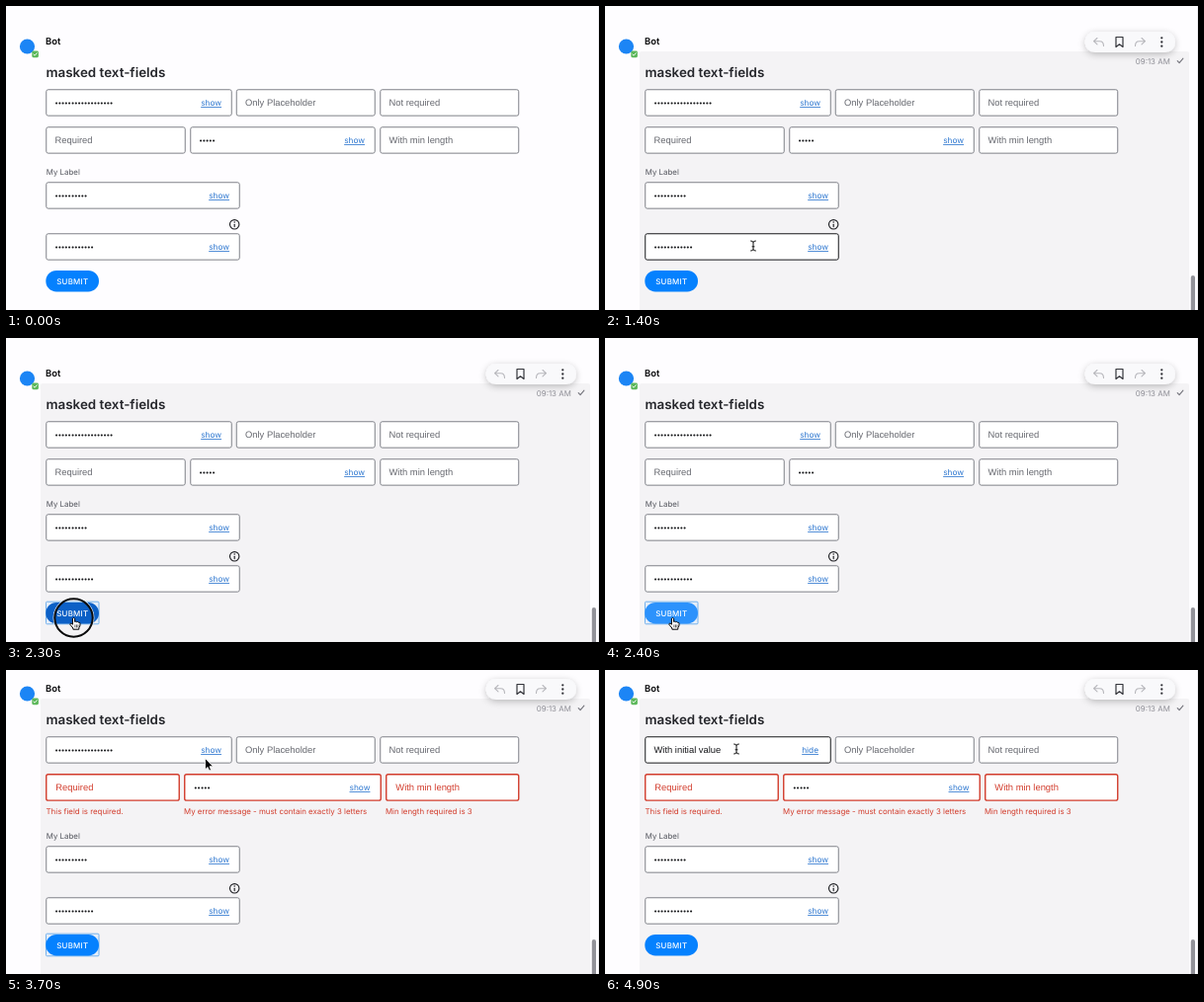
Recreate the animation shown at these times as an HTML page. Size 600 by 308 pixels, loop 5000 ms.

```html
<!DOCTYPE html>
<html lang="en">
<head>
<meta charset="utf-8">
<title>Masked text fields</title>
<style>
  html, body { margin: 0; width: 600px; height: 308px; overflow: hidden; background: #fefdff; }
  svg { display: block; }
  text {
    font-family: Inter, "Liberation Sans", sans-serif;
    font-size: 7.88px;
    text-rendering: geometricPrecision;
    white-space: pre;
  }
  .name { font-size: 9.45px; font-weight: 600; fill: #0c0c0e; }
  .title { font-size: 13.4px; font-weight: 600; fill: #25262b; }
  .hint, .value, .dots, .bad { font-family: "Liberation Sans", Arial, sans-serif; font-size: 9.4px; }
  .hint { fill: #66686f; }
  .value, .dots { fill: #17181b; }
  .dots { font-size: 7.6px; letter-spacing: .61px; }
  .bad { fill: #d23c2c; }
  .link { font-size: 8.3px; fill: #2f78d0; text-anchor: middle; text-decoration: underline; }
  .label { fill: #54565e; }
  .error { fill: #d23c2c; }
  .time { fill: #8d8d95; }
  .submit { font-weight: 500; letter-spacing: .25px; fill: #fff; text-anchor: middle; }
  .line { fill: none; stroke-linecap: round; stroke-linejoin: round; }
</style>
</head>
<body>
<svg id="stage" width="600" height="308" viewBox="0 0 600 308">
  <defs>
    <filter id="soft" x="-25%" y="-80%" width="150%" height="280%">
      <feDropShadow dx="0" dy="2" stdDeviation="3.5" flood-color="#000" flood-opacity=".24"/>
    </filter>
  </defs>
  <g id="scene"></g>
</svg>
<script>
const LOOP = 5000, STEP = 100, SHIFT = 17;
const AT = { enter: 600, hover: 1200, press: 2200, release: 2400, errors: 2500, click: 3900, reveal: 4000, clickEnd: 4100 };

// time, x, y of the pointer tip
const PATH = [
  [600, 350, 302], [800, 333, 254], [1000, 322, 225], [1100, 306, 224],
  [1200, 262, 228], [1400, 150, 243], [1600, 88, 251], [1700, 82, 252],
  [1800, 79, 257], [2000, 72, 274], [2200, 68.5, 283.5], [2500, 68.5, 283.5],
  [2900, 62, 282.5], [3000, 61, 282.3], [3200, 84, 242], [3500, 180, 118],
  [3700, 201.5, 89.5], [3900, 207, 84], [4200, 207, 84], [4500, 204, 84],
  [4600, 204, 84], [4700, 182, 82], [4800, 148, 80], [4900, 133, 80]
];

const scene = document.getElementById('scene');
const text = (x, y, cls, str) => `<text x="${x}" y="${y}" class="${cls}">${str}</text>`;
const group = (x, y, body) => `<g transform="translate(${x} ${y})">${body}</g>`;
const line = (d, color, width) => `<path class="line" d="${d}" stroke="${color}" stroke-width="${width}"/>`;

function pointAt(t) {
  if (t < AT.enter) return null;
  const i = PATH.findIndex(p => p[0] > t);
  if (i < 0) return PATH[PATH.length - 1].slice(1);
  const [t0, x0, y0] = PATH[i - 1], [t1, x1, y1] = PATH[i];
  const k = (t - t0) / (t1 - t0);
  return [x0 + (x1 - x0) * k, y0 + (y1 - y0) * k];
}

const inside = (p, x0, y0, x1, y1) => p && p[0] >= x0 && p[0] <= x1 && p[1] >= y0 && p[1] <= y1;
const overInput = (p, f) => inside(p, f.x0, f.y, f.link ? f.x1 - 36 : f.x1, f.y + 27);
const overButton = p => inside(p, 40, 268, 94, 290);
const linkX = f => f.x1 - (f.bad ? 22 : 21.4);

function field(f, p) {
  const { x0, x1, y, bad } = f;
  const color = bad ? '#d23c2c' : overInput(p, f) ? '#17181b' : '#7f8188';
  const x = x0 + (bad ? 10.3 : 9.5);
  const content = f.dots ? text(x + .3, y + 16.7, 'dots', '\u2022'.repeat(f.dots))
    : text(x, y + 17.4, f.value ? 'value' : bad ? 'bad' : 'hint', f.value || f.hint);
  return `<rect x="${x0 + .75}" y="${y + .75}" width="${x1 - x0 - 1.5}" height="26.4" rx="2"
      fill="#fff" stroke="${color}" stroke-width="${bad ? 1.4 : 1}"/>` +
    content + (f.link ? text(linkX(f), y + 17.2, 'link', f.link) : '');
}

function fieldsAt(t) {
  const bad = t >= AT.errors, shown = t >= AT.reveal;
  const a = bad ? 84 - SHIFT : 84, b = a + 38;
  const edges = bad ? [176, 180, 380, 384] : [182, 186, 374, 378];
  const first = shown ? { value: 'With initial value', link: 'hide' } : { dots: 18, link: 'show' };
  return [
    { x0: 40, x1: 229, y: a, ...first },
    { x0: 232.5, x1: 374, y: a, hint: 'Only Placeholder' },
    { x0: 378, x1: 519.5, y: a, hint: 'Not required' },
    { x0: 40, x1: edges[0], y: b, hint: 'Required', bad },
    { x0: edges[1], x1: edges[2], y: b, dots: 5, link: 'show', bad },
    { x0: edges[3], x1: 519.5, y: b, hint: 'With min length', bad },
    { x0: 40, x1: 237, y: 178, dots: 10, link: 'show' },
    { x0: 40, x1: 237, y: 230, dots: 12, link: 'show' }
  ];
}

function avatar() {
  return '<circle cx="21.5" cy="41" r="7.6" fill="#1c85f5"/>' +
    '<rect x="26.3" y="45.6" width="6.6" height="6.6" rx="1.4" fill="#5cb85a"/>' +
    line('M27.9 49l1.2 1.2 2.2-2.5', '#fff', .9);
}

function toolbar() {
  const arrow = 'M-1.5-4L-5-.8-1.5 2.4M-5-.8H1Q5-.8 5 4';
  const bullet = y => `<circle cx="563.3" cy="${y}" r="1.15" fill="#33343a"/>`;
  return '<rect x="485.5" y="26" width="91.5" height="21" rx="10.5" fill="#f9f9fb" filter="url(#soft)"/>' +
    group(499.5, 36.5, line(arrow, '#b7b7bc', 1.1)) +
    line('M517 31.5h7v10l-3.5-2.7-3.5 2.7z', '#33343a', 1.2) +
    `<g transform="translate(541.5 36.5) scale(-1 1)">${line(arrow, '#b7b7bc', 1.1)}</g>` +
    [32.3, 36.5, 40.7].map(bullet).join('') +
    text(536.8, 58.5, 'time', '09:13 AM') +
    line('M579.2 55.6l1.9 2 3.8-4.5', '#74747c', 1.1);
}

function submit(t, p) {
  const down = t >= AT.press && t < AT.release;
  const fill = down ? '#0c60c6' : overButton(p) ? '#2c92fc' : '#0581fe';
  const focus = t >= AT.press && t < AT.click;
  return (focus ? '<rect x="40.5" y="267.2" width="53.5" height="22.6" rx="1" fill="#e6eef8" stroke="#72b1ee"/>' : '') +
    `<rect x="40.3" y="267.9" width="53.7" height="21.5" rx="10.75" fill="${fill}"/>` +
    text(67.3, 281.5, 'submit', 'SUBMIT');
}

function info() {
  return '<circle cx="231.2" cy="221.3" r="4.7" fill="none" stroke="#1c1d21" stroke-width="1.1"/>' +
    line('M231.2 221.2v2.4', '#1c1d21', 1.1) +
    '<circle cx="231.2" cy="219" r=".75" fill="#1c1d21"/>';
}

const BEAM = 'M-2.4-5Q0-5 0-3.5Q0-5 2.4-5M0-3.5V3.5M-2.4 5Q0 5 0 3.5Q0 5 2.4 5M-1 .8H1';
const SHAPES = {
  arrow: '<path d="M0 0V11.3L2.6 8.9 4.2 12.6 6 11.8 4.5 8.2H8Z" fill="#000" stroke="#fff" stroke-width=".8"/>',
  beam: line(BEAM, '#fff', 2.2) + line(BEAM, '#111', 1),
  hand: `<path d="M-1.1.7Q0-.8 1.1.7V4Q2.2 3.3 3 4.2Q4.2 3.7 4.9 4.7Q6.6 4.4 6.6 6.2
      Q6.6 9 5.3 10.2V11.7H-.6V10.5L-3.7 6.7Q-3.6 5.1-2.2 5.8L-1.1 6.8Z"
      fill="#fff" stroke="#000" stroke-width="1" stroke-linejoin="round"/>` +
    line('M1.4 7.3v2.2M3 7.3v2.2M4.5 7.3v2.2', '#000', .6)
};

function pointerKind(t, p, fields) {
  if (overButton(p)) return 'hand';
  if (t < AT.hover) return 'arrow';
  const overLink = f => f.link && inside(p, linkX(f) - 11, f.y + 7, linkX(f) + 11, f.y + 20);
  if (fields.some(overLink)) return 'hand';
  return fields.some(f => overInput(p, f)) ? 'beam' : 'arrow';
}

function pointer(t, p, fields) {
  if (!p) return '';
  const pressed = (t >= AT.press && t < AT.release) || (t >= AT.click && t < AT.clickEnd);
  const ring = pressed
    ? '<circle r="20.4" fill="none" stroke="#fff" stroke-width="1"/>' +
      '<circle r="19.2" fill="none" stroke="#0b0b0c" stroke-width="2"/>' : '';
  return group(p[0], p[1], ring + SHAPES[pointerKind(t, p, fields)]);
}

function draw(t) {
  const p = pointAt(t), fields = fieldsAt(t);
  const bad = t >= AT.errors, hover = t >= AT.hover;
  const lift = bad ? -SHIFT : 0;
  const panel = hover
    ? `<rect x="35" y="${46 + lift}" width="556" height="300" rx="2" fill="#f4f3f5"/>` +
      '<rect x="592.8" y="273" width="4.2" height="40" rx="2.1" fill="#929299"/>' : '';
  const head = group(0, lift, avatar() + text(40, 39.2, 'name', 'Bot') +
    text(40.5, 71.8, 'title', 'masked text-fields') + (hover ? toolbar() : ''));
  const errors = bad
    ? text(40.5, 145.7, 'error', 'This field is required.') +
      text(180, 145.7, 'error', 'My error message - must contain exactly 3 letters') +
      text(384, 145.7, 'error', 'Min length required is 3') : '';
  scene.innerHTML = '<rect x="599" width="1" height="308" fill="#efeef2"/>' + panel + head +
    fields.map(f => field(f, p)).join('') + errors +
    text(40.8, 170.6, 'label', 'My Label') + info() + submit(t, p) + pointer(t, p, fields);
}

const start = performance.now();
let last = -1;
function tick() {
  const t = Math.floor(((performance.now() - start) % LOOP) / STEP) * STEP;
  if (t !== last) draw(last = t);
  requestAnimationFrame(tick);
}
tick();
</script>
</body>
</html>
```
